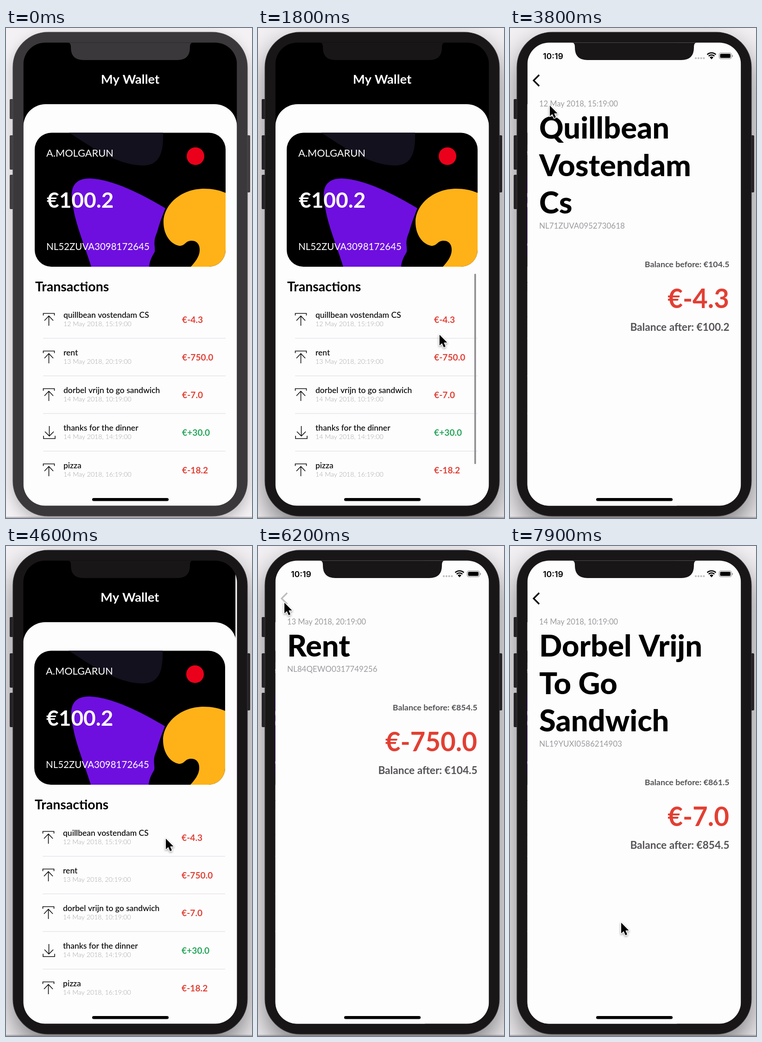
Recreate the animation shown at these times as an HTML page with a canvas. Size 531x1055 px, loop 8 s.

```html
<!DOCTYPE html>
<html lang="en">
<head>
<meta charset="utf-8">
<title>Wallet</title>
<style>
html, body { margin: 0; width: 531px; height: 1055px; overflow: hidden; }
canvas { display: block; }
</style>
</head>
<body>
<canvas id="stage" width="531" height="1055"></canvas>
<script>
const ctx = document.getElementById('stage').getContext('2d');
const LOOP = 8000, SCREEN_X = 37.5, SCREEN_W = 461;
const RED = '#df4236', GREEN = '#27a65b';

const transactions = [
  { name: 'quillbean vostendam CS', date: '12 May 2018, 15:19:00', amount: -4.3,
    lines: ['Quillbean', 'Vostendam', 'Cs'], account: 'NL71ZUVA0952730618', before: 104.5 },
  { name: 'rent', date: '13 May 2018, 20:19:00', amount: -750,
    lines: ['Rent'], account: 'NL84QEWO0317749256', before: 854.5 },
  { name: 'dorbel vrijn to go sandwich', date: '14 May 2018, 10:19:00', amount: -7,
    lines: ['Dorbel Vrijn', 'To Go', 'Sandwich'], account: 'NL19YUXI0586214903', before: 861.5 },
  { name: 'thanks for the dinner', date: '14 May 2018, 14:19:00', amount: 30 },
  { name: 'pizza', date: '14 May 2018, 16:19:00', amount: -18.2 },
];

// Times of row press, page push, back press and page pop.
const visits = [
  { row: 0, down: 2420, open: 2680, back: 4080, close: 4230 },
  { row: 1, down: 4880, open: 5050, back: 6180, close: 6340 },
  { row: 2, down: 6740, open: 6900, back: Infinity, close: Infinity },
];

// Pointer keys: time, x, y.
const pointerKeys = [
  [100, 440, 720], [700, 402, 677], [1500, 402, 677], [2300, 370, 625], [3400, 370, 625],
  [3800, 86, 167], [4050, 57, 122], [4250, 57, 122], [4600, 345, 630], [4900, 375, 700],
  [5750, 375, 700], [6150, 57, 122], [6350, 57, 122], [6800, 300, 785], [7300, 300, 785],
  [7900, 240, 811],
];

const clamp = v => Math.min(1, Math.max(0, v));
const smooth = (t, from, to) => { const q = clamp((t - from) / (to - from)); return q * q * (3 - 2 * q); };
const spring = ms => { const k = Math.max(0, ms) * 0.019; return 1 - (1 + k) * Math.exp(-k); };

function text(str, x, y, size, color, weight = 400, align = 'left', family = 'Lato') {
  ctx.font = `${weight} ${size}px ${family}, sans-serif`;
  ctx.textAlign = align;
  ctx.fillStyle = color;
  ctx.fillText(str, x, y);
}

function box(x, y, w, h, r, color) {
  ctx.beginPath();
  ctx.roundRect(x, y, w, h, r);
  ctx.fillStyle = color;
  ctx.fill();
}

function shape(d, color) {
  ctx.fillStyle = color;
  ctx.fill(new Path2D(d));
}

function line(d, width, color) {
  ctx.lineWidth = width;
  ctx.strokeStyle = color;
  ctx.stroke(new Path2D(d));
}

function dot(x, y, r, color) {
  ctx.beginPath();
  ctx.arc(x, y, r, 0, 2 * Math.PI);
  ctx.fillStyle = color;
  ctx.fill();
}

function layer(draw, dx = 0, dy = 0) {
  ctx.save();
  ctx.translate(dx, dy);
  draw();
  ctx.restore();
}

function clipBox(x, y, w, h, r = 0) {
  ctx.beginPath();
  ctx.roundRect(x, y, w, h, r);
  ctx.clip();
}

const money = (value, sign) => `€${sign < 0 ? '-' : '+'}${Math.abs(value).toFixed(1)}`;

function drawCard() {
  clipBox(62, 225.5, 412, 288.5, 36);
  ctx.fillStyle = '#000';
  ctx.fillRect(62, 225, 412, 290);
  shape('M136 225C175 250 238 296 296 296C336 296 340 260 339 225Z', '#12111d');
  shape('M142 364C140 338 154 323 182 324C230 326 292 357 344 388C336 408 331 422 326 440C316 462 ' +
    '323 470 321 482C313 495 310 503 309 514H184C168 462 146 415 142 364Z', '#6e0fdf');
  shape('M474 355C460 349 445 346 428 346C376 346 340 382 340 418C340 444 354 465 374 469' +
    'C388 469 386 458 401 458C414 458 419 469 418 480C417 493 408 504 399 514H474Z', '#ffb217');
  dot(409, 276, 19, '#eb001b');
  text('A.MOLGARUN', 87, 277, 21.8, '#fff');
  text('€100.2', 88, 387, 46, '#fff', 700);
  text('NL52ZUVA3098172645', 87, 478, 20.5, '#fff');
}

function drawRow({ name, date, amount }, top, pressed) {
  line(`M80 ${top + 81}H474`, 1.3, '#e6e5e8');
  if (pressed) {
    ctx.fillStyle = '#d2d0d2';
    ctx.fillRect(62, top, 412, 81);
  }
  layer(() => line(amount < 0
    ? 'M80.5 32V27.500H104.500V32M92.500 54V33M83 43L92.500 33L102 43'
    : 'M81 48V54H106V48M93.500 27V48.500M84 39L93.500 48.500L103 39', 1.6, '#111'), 0, top);
  text(name, 124, top + 37, 17.5, '#000', 500);
  text(date, 124, top + 55, 14.2, '#a3a2a5', 300);
  text(money(amount, amount), 380, top + 48, 19.2, amount < 0 ? RED : GREEN, 700);
}

function drawHome(t, pressedRow) {
  ctx.fillStyle = '#000';
  ctx.fillRect(SCREEN_X, 31, SCREEN_W, 998);
  box(SCREEN_X, 164, SCREEN_W, 870, [48, 48, 0, 0], '#fefdfe');

  const scroll = 31 * (smooth(t, 750, 1150) - smooth(t, 1350, 1800));
  layer(() => {
    clipBox(SCREEN_X, 526, SCREEN_W, 449);
    text('Transactions', 63, 567 - scroll, 28.5, '#000', 700);
    transactions.forEach((item, i) => drawRow(item, 587 + 81 * i - scroll, i === pressedRow));
    ctx.globalAlpha = smooth(t, 750, 850) - smooth(t, 1850, 2150);
    box(467, 529 + scroll, 3.5, 410, 2, '#8e8c90');
  });
  layer(drawCard);
}

function drawDetail({ date, lines, account, amount, before }, age) {
  ctx.fillStyle = '#fefdfe';
  ctx.fillRect(SCREEN_X, 31, SCREEN_W, 998);
  text(date, 63, 169, 16.4, '#9b9a9d');
  lines.forEach((str, i) => text(str, 63, 238 + 80.5 * i, 65, '#000', 800));
  const rest = 1 - clamp(age / 1000);
  const shown = amount * (1 - rest * rest);
  layer(() => {
    text(account, 63, 271, 17, '#9b9a9d');
    text(`Balance before: €${before.toFixed(1)}`, 473.5, 354, 17.8, '#555356', 700, 'right');
    text(money(shown, amount), 473, 441.5, 56.5, '#e23f33', 700, 'right');
    text(`Balance after: €${(before + amount).toFixed(1)}`, 473.5, 491, 22.6, '#555356', 700, 'right');
  }, 0, 80.5 * (lines.length - 1));
}

function drawStatusBar() {
  text('10:19', 71, 67, 17.8, '#000', 600, 'left', 'Inter');
  for (let i = 0; i < 4; i++) dot(401 + i * 5.8, 65, 2.1, 'rgba(0,0,0,.26)');
  for (const r of [13.5, 9]) {
    ctx.beginPath();
    ctx.arc(435, 67, r, -2.33, -0.81);
    ctx.lineWidth = 2.7;
    ctx.strokeStyle = '#000';
    ctx.stroke();
  }
  shape('M435 67.500L431 63Q435 59.500 439 63Z', '#000');
  ctx.beginPath();
  ctx.roundRect(451.5, 53.5, 26.5, 13, 4);
  ctx.lineWidth = 1.2;
  ctx.strokeStyle = 'rgba(0,0,0,.45)';
  ctx.stroke();
  box(453.5, 55.5, 22.5, 9, 2, '#000');
  box(479.3, 58, 1.6, 4.5, 1, 'rgba(0,0,0,.45)');
}

function drawPhone(focused) {
  const body = focused ? '#191618' : '#3a383a';
  ctx.fillStyle = '#f3f1f4';
  ctx.fillRect(0, 0, 531, 1055);
  ctx.save();
  ctx.shadowColor = focused ? 'rgba(0,0,0,.5)' : 'rgba(0,0,0,.25)';
  ctx.shadowBlur = focused ? 60 : 30;
  ctx.shadowOffsetY = focused ? 26 : 12;
  box(15, 9, 506, 1042, 76, body);
  ctx.restore();
  ctx.fillStyle = '#77757a';
  ctx.fillRect(0, 1053, 531, 1);
  for (const [x, y, h] of [[8, 153, 43], [8, 231, 74], [8, 316, 74], [519, 231, 123]]) {
    box(x, y, 8, h, 2, focused ? '#242224' : '#403e40');
  }
  box(15, 9, 506, 1042, 76, body);
  ctx.lineWidth = 1.2;
  ctx.strokeStyle = focused ? '#383638' : '#4b494b';
  ctx.stroke();
  return body;
}

function drawPointer(t) {
  if (t < 100) return;
  const i = Math.max(1, pointerKeys.findIndex(key => key[0] > t));
  const last = pointerKeys.length - 1;
  const n = t >= pointerKeys[last][0] ? last : i;
  const [t0, x0, y0] = pointerKeys[n - 1], [t1, x1, y1] = pointerKeys[n];
  const q = smooth(t, t0, t1);
  layer(() => {
    const arrow = 'M0 0V23L5.300 18.200L9.200 27L13 25.300L9.300 16.800H16.500Z';
    ctx.lineJoin = 'round';
    ctx.shadowColor = 'rgba(0,0,0,.4)';
    ctx.shadowBlur = 4;
    ctx.shadowOffsetY = 2;
    line(arrow, 3, '#fff');
    ctx.shadowColor = 'transparent';
    shape(arrow, '#000');
  }, x0 + (x1 - x0) * q, y0 + (y1 - y0) * q);
}

function draw(t) {
  const visit = visits.filter(v => v.down <= t).pop();
  const page = visit ? spring(t - visit.open) * (1 - spring(t - visit.close)) : 0;
  const pressedRow = visit && t < visit.open + 150 ? visit.row : -1;
  const body = drawPhone(t >= 100);

  layer(() => {
    clipBox(SCREEN_X, 31.5, SCREEN_W, 997, 47);
    layer(() => drawHome(t, pressedRow), -0.3 * SCREEN_W * page);
    if (page > 0) {
      layer(() => drawDetail(transactions[visit.row], t - visit.open), SCREEN_W * (1 - page));
    }
    drawStatusBar();
    ctx.globalAlpha = 1 - page;
    text('My Wallet', 268 - 100 * page, 120, 27.5, '#fff', 700, 'center');
    ctx.globalAlpha = page * (visit && t >= visit.back ? 0.25 : 1);
    line('M63 101L51 113L63 125', 3.3, '#000');
    ctx.globalAlpha = 1;
    shape('M132 31Q140 31 140 40V42Q140 69 167 69H370Q397 69 397 42V40Q397 31 405 31Z', body);
    box(186, 1012, 165, 6.5, 3.25, '#000');
  });
  drawPointer(t);
}

const start = performance.now();
function tick() {
  draw((performance.now() - start) % LOOP);
  requestAnimationFrame(tick);
}
tick();
</script>
</body>
</html>
```
